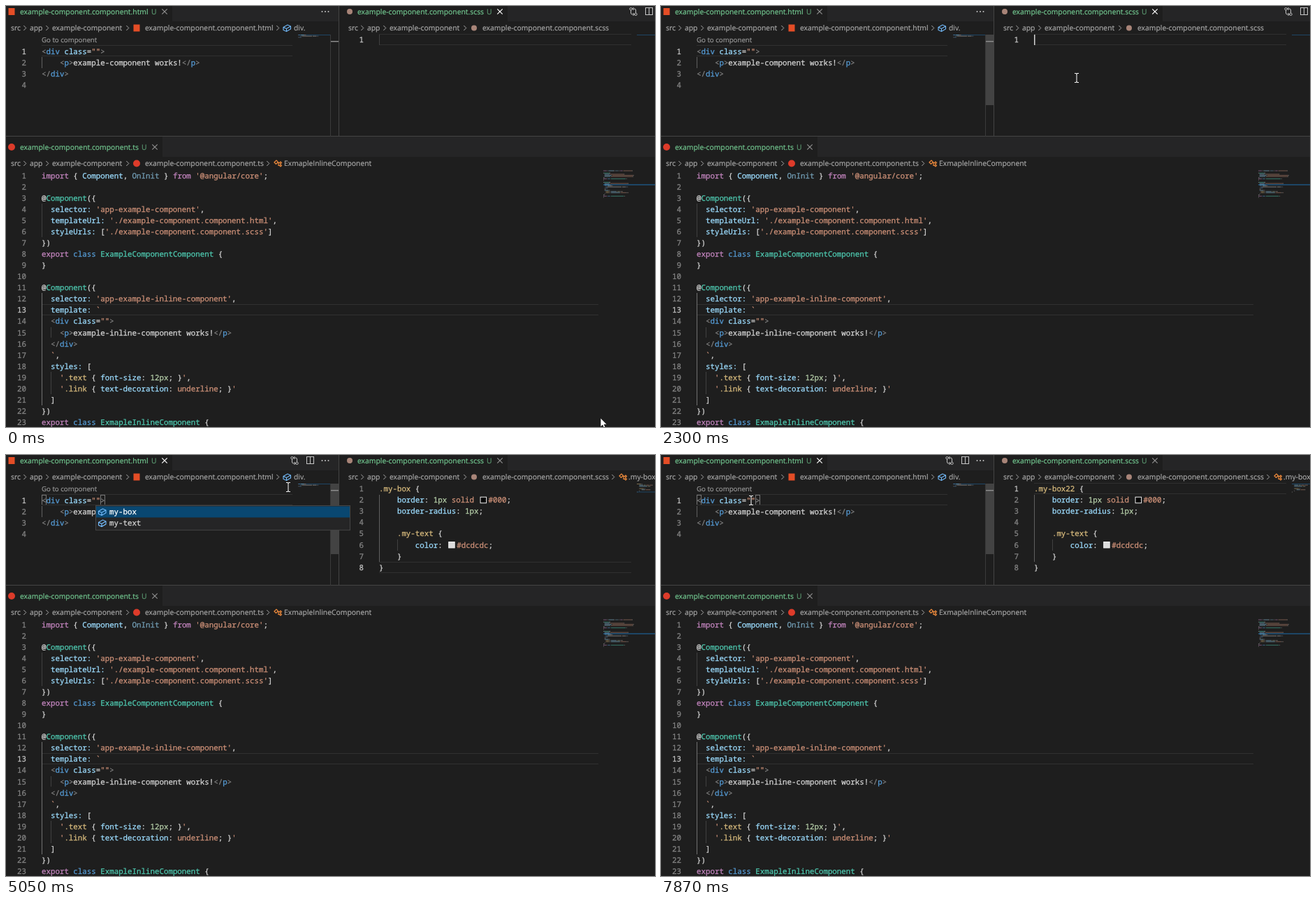
These frames come from a looping animation (929 px wide and 603 px high, 8 s). An HTML page:

```html
<!DOCTYPE html>
<html lang="en">
<head>
<meta charset="utf-8">
<title>Class name completion</title>
<style>
  html, body { margin: 0; width: 100%; height: 100%; overflow: hidden; background: #1e1e1e; }
  svg { display: block; }
  text { white-space: pre; text-rendering: geometricPrecision; }
  /* A thin outline gives the small type its full strength */
  text, tspan { fill: currentColor; stroke: currentColor; stroke-width: .28px; }
  .word { fill: currentColor; opacity: .5; }
  .code { font: 10.8px "Noto Sans Mono", "DejaVu Sans Mono", monospace; color: #d4d4d4; }
  .ui { font: 10.37px "Open Sans", "Noto Sans", sans-serif; color: #a9a9a9; stroke-width: .18px; }
  .lens { font-size: 9.7px; color: #999; }
  .abc { font: bold 7.5px "Open Sans", sans-serif; color: #d4d4d4; }
  .tab { color: #73c991; }
  .p { color: #c586c0; } .w { color: #d4d4d4; } .v { color: #9cdcfe; } .s { color: #ce9178; }
  .b { color: #569cd6; } .t { color: #4ec9b0; } .g { color: #808080; } .n { color: #b5cea8; }
  .y { color: #d7ba7d; } .d { color: #729db4; }
  .num { color: #858585; text-anchor: end; } .num.now { color: #c6c6c6; }
</style>
</head>
<body>
<svg id="stage" width="929" height="603" viewBox="0 0 929 603"></svg>

<!-- "~" plus a letter switches the colour class -->
<script type="text/plain" id="ts">
~pimport ~w{ ~vComponent~w, ~dOnInit ~w} ~pfrom ~s'@angular/core'~w;

~w@~tComponent~w({
  ~vselector: ~s'app-example-component'~w,
  ~vtemplateUrl: ~s'./example-component.component.html'~w,
  ~vstyleUrls: ~w[~s'./example-component.component.scss'~w]
~w})
~pexport ~bclass ~tExampleComponentComponent ~w{
~w}

~w@~tComponent~w({
  ~vselector: ~s'app-example-inline-component'~w,
  ~vtemplate: ~s`
  ~g<~bdiv ~vclass~w=~s""~g>
    ~g<~bp~g>~wexample-inline-component works!~g</~bp~g>
  ~g</~bdiv~g>
  ~s`~w,
  ~vstyles: ~w[
    ~s'~y.text ~w{ ~vfont-size~w: ~n12px~w; }~s'~w,
    ~s'~y.link ~w{ ~vtext-decoration~w: ~sunderline~w; }~s'
  ~w]
~w})
~pexport ~bclass ~tExmapleInlineComponent ~w{
</script>
<script type="text/plain" id="html">
~g<~bdiv ~vclass~w=~s""~g>
    ~g<~bp~g>~wexample-component works!~g</~bp~g>
~g</~bdiv~g>

</script>
<script type="text/plain" id="scss">
~y.my-box ~w{
    ~vborder~w: ~n1px ~ssolid ~s#000~w;
    ~vborder-radius~w: ~n1px~w;

    ~y.my-text ~w{
        ~vcolor~w: ~s#dcdcdc~w;
    ~w}
~w}
</script>

<script>
const LOOP = 8000, CHAR = 6.48, ROW = 16.06;
const stage = document.getElementById('stage');
const timed = [];

// Times, in ms, during which a part is shown
const LEFT = [[1010, 2300], [4240, 5880], [7660, LOOP]];
const RIGHT = [[0, 1010], [2300, 4240], [5880, 7660]];
const DIRTY = [[2930, 3400], [6160, 6500]];
const RIGHT_CLEAN = [[0, 1010], [2300, 2930], [3400, 4240], [5880, 6160], [6500, 7660]];
const FILLED = [[2930, LOOP]], COLOURED = [[3270, LOOP]];
const TOP_LINE = [[0, 2930], [5880, LOOP]], LAST_LINE = [[2930, 5880]];

const within = (t, spans) => spans.some(([a, b]) => t >= a && t < b);

function el(tag, attrs, parent = stage, content) {
  const node = document.createElementNS('http://www.w3.org/2000/svg', tag);
  for (const k in attrs) node.setAttribute(k, attrs[k]);
  if (content !== undefined) node.textContent = content;
  parent.appendChild(node);
  return node;
}
function during(spans, parent = stage) {
  const g = el('g', {}, parent);
  timed.push([g, spans]);
  return g;
}
const rect = (x, y, width, height, fill, parent) => el('rect', {x, y, width, height, fill}, parent);
const frameRect = (x, y, width, height, stroke, w, parent) =>
  el('rect', {x, y, width, height, fill: 'none', stroke, 'stroke-width': w}, parent);
const disc = (cx, cy, r, fill, parent) => el('circle', {cx, cy, r, fill}, parent);
const line = (d, stroke, w, parent) => el('path', {d, stroke, fill: 'none', 'stroke-width': w}, parent);
const text = (x, y, cls, s, parent) => el('text', {x, y, class: cls}, parent, s);
const currentLine = (x, y, width, parent) =>
  line(`M${x} ${y + .5}h${width}m0 15h${-width}`, '#303030', 1, parent);

const source = id => document.getElementById(id).textContent.split('\n').slice(1, -1);
function tokens(src) {
  const indent = src.length - src.trimStart().length;
  const parts = src.trim() ? src.slice(indent).split('~').slice(1) : [];
  return {indent, parts: parts.map(p => [p[0], p.slice(1)])};
}
function code(src, x, y, parent) {
  const {indent, parts} = tokens(src);
  const node = text(x + indent * CHAR, y, 'code', '', parent);
  for (const [cls, s] of parts) el('tspan', {class: cls}, node, s);
}
const number = (n, x, y, now, parent) => text(x, y, 'code num' + (now ? ' now' : ''), n, parent);

function minimap(lines, x, y, parent) {
  lines.forEach((src, i) => {
    const {indent, parts} = tokens(src);
    let col = indent;
    for (const [cls, s] of parts) {
      for (const m of s.matchAll(/\S+/g))
        el('rect', {x: x + (col + m.index) * .84, y: y + i * 1.65, width: m[0].length * .84,
          height: 1, class: 'word ' + cls}, parent);
      col += s.length;
    }
  });
}

// Small interface icons
const cross = (x, y, colour, parent) =>
  line(`M${x - 3.7} ${y - 3.7}l7.4 7.4m0-7.4l-7.4 7.4`, colour, 1.2, parent);
const chevron = (x, y, parent) => line(`M${x - 1.7} ${y - 3.5}l3.5 3.5l-3.5 3.5`, '#a9a9a9', 1, parent);
const cube = (x, y, parent) =>
  line(`M${x - 5} ${y - 1}l6-3.5l4.5 2v4l-6 3.5l-4.5-2zl4.5 2l6-3.5m-6 3.5v4`, '#75beff', 1.1, parent);
function classIcon(x, y, parent) {
  const orange = '#ee8a3c';
  line(`M${x - 5} ${y - 1.5}l3-3l2.5 2.5l-3 3zM${x - 1} ${y - 1}h4m-2 0v4h2`, orange, 1.2, parent);
  line(`M${x + 2.5} ${y - 1}l1.5-1.5l1.5 1.5l-1.5 1.5zm0 4l1.5-1.5l1.5 1.5l-1.5 1.5z`, orange, 1.1, parent);
}
function compareIcon(x, y, parent) {
  line(`M${x - 3.5} ${y - 2}v4q0 2 2 2h3m-2-2l2 2l-2 2M${x + 3.5} ${y + 2}v-4q0-2-2-2h-3m2-2l-2 2l2 2`, '#c5c5c5', 1, parent);
  for (const s of [-1, 1])
    el('circle', {cx: x + 3.5 * s, cy: y + 3.8 * s, r: 1.7, fill: '#252526', stroke: '#c5c5c5'}, parent);
}
function actions(x, parent) {
  compareIcon(x, 8, parent);
  frameRect(x + 17.5, 2.5, 10, 10, '#c5c5c5', 1, parent);
  line(`M${x + 22.5} 2.5v10`, '#c5c5c5', 1, parent);
}
const mark = {
  html: (x, y) => rect(x - 4.5, y - 5, 9, 10, '#e44d26'),
  scss: (x, y) => disc(x, y, 4, '#a88478'),
  ts: (x, y) => disc(x, y, 5, '#dd3b2a'),
};

// Tab, breadcrumb and their icons for one pane
function header(x, tabY, ext, tabWidth, markX, nextChevron) {
  const name = 'example-component.component.' + ext, y = tabY + 23.5;
  rect(x, tabY - 15, tabWidth, 29, '#1e1e1e');
  mark[ext](x + markX, tabY);
  const nameX = x + (ext === 'scss' ? 26 : 20), uX = x + tabWidth - 30;
  text(nameX, tabY + 4, 'ui tab', name);
  el('text', {x: uX, y: tabY + 4, class: 'ui tab', opacity: .7}, stage, 'U');
  const left = x ? x + 6 : 0;
  [[7, 'src'], [34, 'app'], [66, 'example-component'], [199, name]]
    .forEach(([dx, s]) => text(left + dx, y + 3.8, 'ui', s));
  [27, 59, 174, nextChevron].forEach(dx => dx && chevron(left + dx, y));
  mark[ext](left + 187, y);
}

// Bars and dividers
rect(0, 0, 929, 603, '#1e1e1e');
rect(0, 0, 929, 22, '#252526');
rect(0, 187, 929, 29, '#252526');
header(0, 8, 'html', 238, 8, 389);
header(477, 8, 'scss', 241, 15);
header(0, 202, 'ts', 224, 8, 375);
rect(0, 186, 929, 1, '#444');
rect(476, 0, 1, 187, '#444');
rect(464, 41, 1, 146, '#3a3a3a');
cross(213, 202, '#8f8f8f');
cube(402, 31.5);
text(412, 35.3, 'ui', 'div.');
classIcon(389, 225.5);
text(398, 229.3, 'ui', 'ExmapleInlineComponent');
[452.5, 457, 461.5].forEach(x => disc(x, 8, 1, '#c5c5c5'));

const leftOn = during(LEFT), rightOn = during(RIGHT);
cross(227, 8, '#fff', leftOn);
cross(707, 8, '#8f8f8f', leftOn);
cross(227, 8, '#8f8f8f', rightOn);
actions(413, leftOn);
actions(898, rightOn);
cross(707, 8, '#fff', during(RIGHT_CLEAN));
disc(707, 8, 4, '#fff', during(DIRTY));

// Class file pane
const ts = source('ts');
currentLine(51, 427, 797);
line('M51.5 283v48M64.5 460v15M64.5 524v32', '#404040', 1);
line('M51.5 411v161', '#707070', 1);
ts.forEach((src, i) => {
  const y = 246.7 + i * ROW;
  number(i + 1, 29, y, i === 12);
  code(src, 51, y);
});
rect(855, 255, 74, 2, '#1d4666');
minimap(ts.concat('~w}'), 855, 235.5);

// Template pane
const html = source('html');
text(51, 52.3, 'ui lens', 'Go to component');
currentLine(51, 56, 359);
rect(51, 73, 1, 16, '#606060');
html.forEach((src, i) => {
  const y = 68.5 + i * ROW;
  number(i + 1, 29, y, i === 0);
  code(src, 51, y);
});
rect(418, 41, 46, 1, '#1d4666');
minimap(html, 418, 41);
rect(465, 41, 11, 101, '#434343', during([[560, 5880], [6600, LOOP]]));
rect(465, 50, 11, 1.5, '#8c8c8c');
frameRect(51.5, 57.5, 6, 14, '#777', 1, leftOn);
frameRect(135.5, 57.5, 6, 14, '#777', 1, leftOn);

// Style pane
const scss = source('scss');
const rightY = i => 52.2 + i * ROW;
const filled = during(FILLED), topLine = during(TOP_LINE), lastLine = during(LAST_LINE);
currentLine(534, 40, 361, topLine);
currentLine(534, 153, 361, lastLine);
rect(534, 41, 1, 15, '#404040', during([[0, 2930]]));
rect(903, 41, 26, 1, '#1d4666', topLine);
rect(903, 52.5, 26, 1, '#1d4666', lastLine);
number(1, 512, rightY(0), true, topLine);
number(1, 512, rightY(0), false, lastLine);
line('M534.5 57v96', '#606060', 1, filled);
line('M560.5 121v16', '#404040', 1, filled);
const plain = during([[2930, 3270]]), coloured = during(COLOURED);
scss.forEach((src, i) => {
  const y = rightY(i);
  if (i && i < 7) number(i + 1, 512, y, false, filled);
  if (!i) return;
  const [head, value] = src.split('~s#');
  code(head, 534, y, filled);
  if (!value) return;
  const x = 534 + head.replace(/~./g, '').length * CHAR;
  code('~s#' + value, x, y, plain);
  code('~s#' + value, x + 14, y, coloured);
  const box = rect(x + 2.5, y - 8, 8.5, 8.5, i === 1 ? '#000' : '#dcdcdc', coloured);
  box.setAttribute('stroke', '#eee');
});
number(8, 512, rightY(7), true, lastLine);
number(8, 512, rightY(7), false, during([[5880, LOOP]]));
[['', 2930, 6160], ['2', 6160, 6300], ['22', 6300, LOOP]].forEach(([s, a, b]) =>
  code(`~y.my-box${s} ~w{`, 534, rightY(0), during([[a, b]])));
minimap(scss, 903, 41, filled);
chevron(869, 31.5, coloured);
classIcon(883, 31.5, coloured);
text(891, 35.3, 'ui', '.my-box', coloured);

// Text carets
const caret = (x, y, ...spans) => rect(x, y, 1.5, 15, '#d4d4d4', during(spans));
caret(128.5, 57, [1010, 1510], [2010, 2300], [4240, 4740], [5240, 5740], [7660, 7870]);
caret(534, 41, [300, 800], [2300, 2710]);
caret(540, 153, [2930, 3430], [3930, 4240]);
caret(579, 41, [5880, 6160]);
caret(585.5, 41, [6160, 6300]);
caret(592, 41, [6300, 6800], [7300, 7660]);

// Suggestion lists
function popup(words, span, drawIcon) {
  const g = during([span]), height = words.length * ROW + 3;
  const box = rect(128.5, 72.5, 364, height, '#252526', g);
  box.setAttribute('stroke', '#454545');
  rect(129, 73.5, 363, 16, '#094771', g);
  const hover = rect(129, 0, 363, 16, '#2a2d2e', g);
  words.forEach((word, i) => {
    const y = 81 + i * ROW;
    drawIcon(y, g);
    const label = text(148, y + 3.8, 'code', word, g);
    if (!i) label.style.color = '#fff';
  });
  return {span, hover, rows: words.length, bottom: 72.5 + height};
}
const popups = [
  popup(['class', 'div', 'example-component', 'p', 'works'], [1400, 2300],
    (y, g) => text(131, y + 2.8, 'abc', 'abc', g)),
  popup(['my-box', 'my-text'], [4600, 5810], (y, g) => cube(137.5, y + .5, g)),
];

// Pointer: time, x, y
const path = [
  [0, 851, 590], [70, 851, 590], [140, 884, 565], [610, 213, 157], [680, 198, 120],
  [810, 134, 66], [1010, 134, 66], [1140, 131, 66], [1400, 131, 66], [1820, 436, 121],
  [2170, 595, 103], [3400, 595, 103], [4040, 130, 64], [4640, 130, 64], [5050, 404, 46],
  [5400, 500, 35], [5810, 585, 54], [6400, 585, 54], [6920, 194, 104], [7130, 116, 92],
  [7470, 129, 65], [LOOP, 129, 65],
];
const pointer = el('g');
const shapes = {
  arrow: el('path', {d: 'M0 0v13l3-2.8l2 4.6l2.2-1l-2-4.4h4z', fill: '#fff', stroke: '#111', 'stroke-width': .7}, pointer),
  beam: line('M-3-6.5h2q1 0 1 1q0-1 1-1h2M0-6v12M-3 6.5h2q1 0 1-1q0 1 1 1h2', '#fff', 1, pointer),
  hand: el('path', {d: 'M-1.5 1q1.5-2 3 0v5.5q2-1 3 .5q2-.8 2.5 .7q1.8-.2 1.8 1.5v4l-1.8 4.5h-6.5l-5.5-7.5q.2-2 3.5 .5z',
    fill: '#fff', stroke: '#111', 'stroke-width': .7}, pointer),
};

function pointerAt(t) {
  const i = path.findIndex(k => k[0] > t);
  const [t0, x0, y0] = path[i - 1], [t1, x1, y1] = path[i];
  const steps = Math.max(1, Math.round((t1 - t0) / 67.3));
  const p = Math.floor((t - t0) / (t1 - t0) * steps + .001) / steps;
  return [x0 + (x1 - x0) * p, y0 + (y1 - y0) * p];
}

function draw(t) {
  for (const [node, spans] of timed) node.style.display = within(t, spans) ? '' : 'none';
  const [x, y] = pointerAt(t);
  let shape = x > 848 || (y > 187 && y < 235) || (x > 464 && x < 477) ? 'arrow' : 'beam';
  for (const {span, hover, rows, bottom} of popups) {
    const over = within(t, [span]) && x > 128 && x < 492 && y > 73 && y < bottom;
    const row = Math.min(rows - 1, Math.floor((y - 73.5) / ROW));
    if (over) shape = 'hand';
    hover.style.display = over && row > 0 ? '' : 'none';
    hover.setAttribute('y', 73.5 + row * ROW);
  }
  for (const k in shapes) shapes[k].style.display = k === shape ? '' : 'none';
  pointer.setAttribute('transform', `translate(${x} ${y})`);
}

const start = performance.now();
function tick() {
  draw((performance.now() - start) % LOOP);
  requestAnimationFrame(tick);
}
tick();
</script>
</body>
</html>
```
